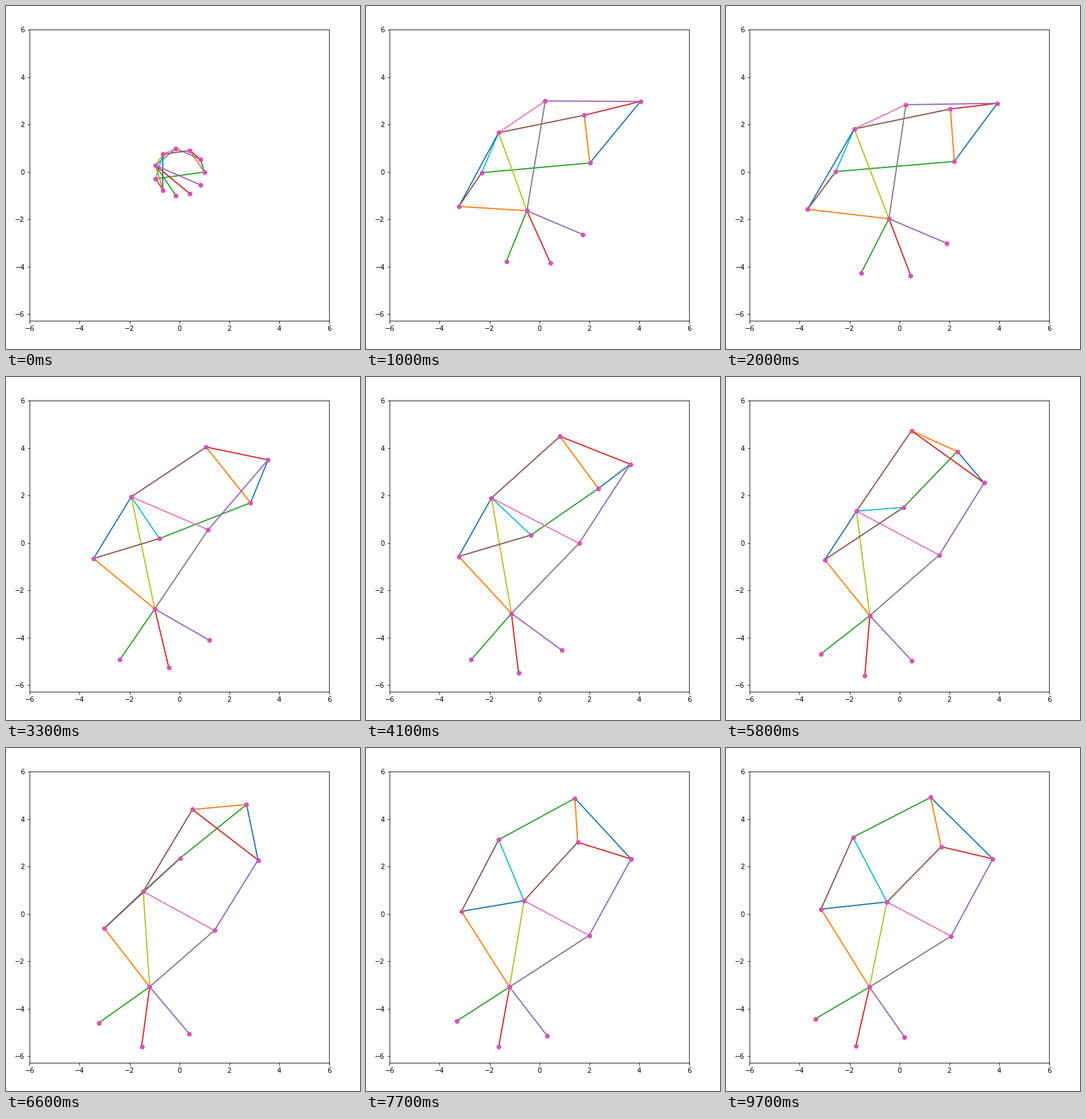
Recreate the animation shown at these times as a matplotlib script. Size 526 by 510 pixels, loop 9800 ms.

```python
import numpy as np
import matplotlib.pyplot as plt
from matplotlib.animation import FuncAnimation

W, H, DPI = 526, 510, 72
FRAMES, STEP_MS = 98, 100
NODES, HUB = 11, 5
ARM, SPREAD = 2.54, 46          # pendant edges of the hub: length, degrees apart
DOT = "#d852b8"

EDGES = [(0, 1), (0, 2), (0, 6), (1, 2), (1, 3), (2, 4), (3, 4), (3, 5),
         (4, 5), (4, 6), (4, 7), (5, 7), (5, 8), (5, 9), (5, 10), (6, 7)]

# Way points of the free nodes at the turning times; the last one is at rest
TURNS = (2.0, 3.3, 5.0, 6.6, 9.7)
PATHS = {
    0: [(2.2, .45), (2.85, 1.7), (1.77, 2.98), (2.69, 4.62), (1.25, 4.92)],
    1: [(3.92, 2.9), (3.55, 3.51), (3.74, 2.89), (3.15, 2.28), (3.74, 2.33)],
    2: [(2.04, 2.66), (1.07, 4.05), (.71, 4.7), (.52, 4.41), (1.67, 2.84)],
    3: [(.26, 2.84), (1.15, .56), (1.85, -.26), (1.4, -.69), (2.07, -.93)],
    4: [(-1.81, 1.82), (-1.93, 1.95), (-1.83, 1.71), (-1.45, .95), (-.5, .51)],
    6: [(-2.55, .02), (-.8, .19), (-.14, .71), (.03, 2.36), (-1.86, 3.24)],
    7: [(-3.68, -1.57), (-3.44, -.65), (-3.04, -.65), (-3.01, -.6), (-3.14, .21)],
}


def blend(a, b, k):
    return a + (b - a) * k


def polar(radius, degrees):
    a = np.radians(degrees)
    return radius * np.array([np.cos(a), np.sin(a)])


def hub_at(t):
    """The hub sinks and slows down exponentially."""
    return np.array([-1.2, -3.08]) + np.array([.78, 1.11]) * np.exp(2 - t)


def layout(t, free):
    """Free nodes as given, hub and its turning fan of pendants by rule."""
    p = np.zeros((NODES, 2))
    p[list(PATHS)] = free
    p[HUB] = hub_at(t)
    middle = 254 + 36 / (1 + ((t - 2) / 2.6) ** 2)
    for k in (-1, 0, 1):
        p[9 + k] = p[HUB] + polar(ARM, middle + k * SPREAD)
    return p


def build_keys():
    free = dict(zip(TURNS, np.array(list(PATHS.values())).swapaxes(0, 1)))
    # Most of the last swing is quick, the rest a slow drift
    for t, k in ((7.7, 0.88), (8.6, 0.96)):
        free[t] = blend(free[6.6], free[9.7], k)
    keys = {t: layout(t, f) for t, f in free.items()}

    # Burst out of the ring, the two upper nodes overshoot
    ring = np.array([polar(1, 360 * n / NODES) for n in range(NODES)])
    burst = blend(ring, keys[2.0], 0.85)
    burst[[1, 3]] *= 1.17
    keys.update({0.0: ring, 0.4: blend(ring, burst, 0.7), 1.0: burst})
    times = np.array(sorted(keys))
    return times, np.array([keys[t] for t in times])


TIMES, POSES = build_keys()
SLOPES = np.gradient(POSES, TIMES, axis=0)


def pose(t):
    """Cubic Hermite curve through the key layouts."""
    i = int(np.clip(np.searchsorted(TIMES, t, side="right") - 1, 0, len(TIMES) - 2))
    h = TIMES[i + 1] - TIMES[i]
    u = (t - TIMES[i]) / h
    return ((1 + 2 * u) * (1 - u) ** 2 * POSES[i]
            + u * (1 - u) ** 2 * h * SLOPES[i]
            + u * u * (3 - 2 * u) * POSES[i + 1]
            + u * u * (u - 1) * h * SLOPES[i + 1])


plt.rcParams["font.family"] = "DejaVu Sans"
fig = plt.figure(figsize=(W / DPI, H / DPI), dpi=DPI, facecolor="white")
left, right, top, bottom = 35.1, 480.3, 35.4, 467.55
ax = fig.add_axes([left / W, 1 - bottom / H, (right - left) / W, (bottom - top) / H])
ax.set_xlim(-6, 6)
ax.set_ylim(-6.258, 6)
ax.set_xticks(range(-6, 7, 2))
ax.set_yticks(range(-6, 7, 2))

lines = [ax.plot([], [], color=f"C{n % 10}", lw=1.8)[0] for n in range(len(EDGES))]
dots, = ax.plot([], [], "o", color=DOT, ms=6)


def draw(frame):
    p = pose(frame * STEP_MS / 1000)
    for line, edge in zip(lines, EDGES):
        line.set_data(*p[list(edge)].T)
    dots.set_data(*p.T)
    return [*lines, dots]


anim = FuncAnimation(fig, draw, frames=FRAMES, interval=STEP_MS,
                     init_func=lambda: draw(0), repeat=True, repeat_delay=0)
plt.show()
```
